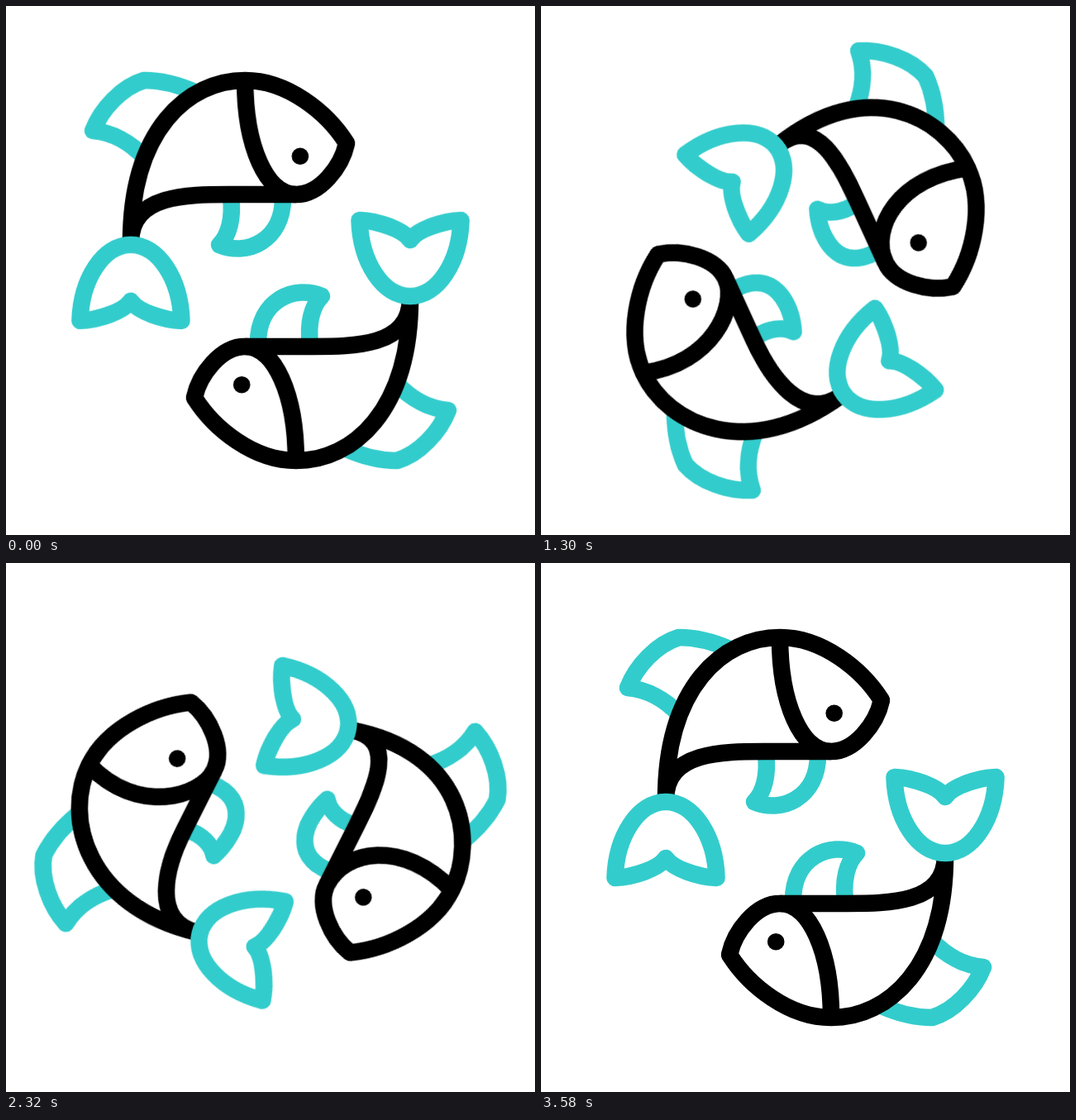
Animation, 640 px wide and 640 px high, one loop 3600 ms. Source, as an HTML page:

```html
<!DOCTYPE html>
<html lang="en">
<head>
<meta charset="utf-8">
<title>Two circling fish</title>
<style>
  html, body { margin: 0; width: 100%; height: 100%; overflow: hidden; background: #fff; }
  svg { display: block; width: 100%; height: 100%; }
  path { fill: none; stroke: #000; stroke-width: 20.6; stroke-linejoin: round; }
  .teal { stroke: #33cccc; }

  /* Each fish bends in its own way. */
  #fish {
    --hinge: 163.6px 217px;
    --turn: -24deg;
    --body: path("M180 285C125 156 220 90 289 90C340 90 388 128 412 166C406 194 380 228 351 228L270 228C220 228 157 232 180 285");
    --gill: path("M289 90C247 170 299 228 351 228");
  }
  #twin {
    --hinge: 210.8px 231px;
    --turn: -20.2deg;
    --body: path("M174 303C127 168 220 90 289 90C340 90 388 128 412 166C406 194 380 228 351 228L270 228C220 228 154 249 174 303");
    --gill: path("M289 90C247 170 315 228 351 228");
  }

  #pond { transform-origin: 320px 320px; animation: spin 3600ms linear infinite; }
  .tail, .eye, .body, .gill, .belly-fin {
    animation: 3600ms cubic-bezier(.5, 0, .5, 1) infinite;
  }
  .tail { transform-origin: var(--hinge); animation-name: tail; }
  .eye { animation-name: eye; }
  .body { animation-name: body; }
  .gill { animation-name: gill; }
  .belly-fin { animation-name: belly-fin; }

  @keyframes spin {
    0% { transform: rotate(0deg); }
    99.44%, 100% { transform: rotate(180deg); }
  }
  @keyframes tail {
    0%, 49.72%, 99.44%, 100% { transform: rotate(0deg); }
    24.86%, 74.58% { transform: rotate(var(--turn)); }
  }
  @keyframes eye {
    0%, 49.72%, 99.44%, 100% { transform: translateX(0); }
    24.86%, 74.58% { transform: translateX(-16px); }
  }
  @keyframes body {
    0%, 49.72%, 99.44%, 100% {
      d: path("M151 286C151 150 220 90 289 90C340 90 388 128 412 166C406 194 380 228 351 228L270 228C220 228 151 228 151 286");
    }
    24.86%, 74.58% { d: var(--body); }
  }
  @keyframes gill {
    0%, 49.72%, 99.44%, 100% { d: path("M289 90C289 170 315 228 351 228"); }
    24.86%, 74.58% { d: var(--gill); }
  }
  @keyframes belly-fin {
    0%, 49.72%, 99.44%, 100% { d: path("M272 232C275 255 270 278 258 289C290 303 335 285 335 232"); }
    24.86%, 74.58% { d: path("M272 232C275 246 270 260 259 267C290 279 343 286 335 232"); }
  }
</style>
</head>
<body>
<svg viewBox="0 0 640 640">
  <g id="pond">
    <g id="fish">
      <path class="teal" d="M228 104C205 94 185 90 167 90C140 98 115 125 105 151C128 153 150 165 167 183"/>
      <path class="teal belly-fin" d="M272 232C275 255 270 278 258 289C290 303 335 285 335 232"/>
      <path class="body" d="M151 286C151 150 220 90 289 90C340 90 388 128 412 166C406 194 380 228 351 228L270 228C220 228 151 228 151 286"/>
      <path class="gill" d="M289 90C289 170 315 228 351 228"/>
      <circle class="eye" cx="355.8" cy="181.7" r="10.3"/>
      <path class="teal tail" d="M89.5 381C91 330 118 289 151 289S211 330 212.5 381C190 380 160 370 151 357C142 370 112 380 89.5 381Z"/>
    </g>
  </g>
</svg>
<script>
  const fish = document.getElementById('fish');
  const twin = fish.cloneNode(true);
  twin.id = 'twin';
  twin.setAttribute('transform', 'rotate(180 320 320)');
  twin.querySelector('.eye').setAttribute('cx', 354.7);
  fish.after(twin);
</script>
</body>
</html>
```
